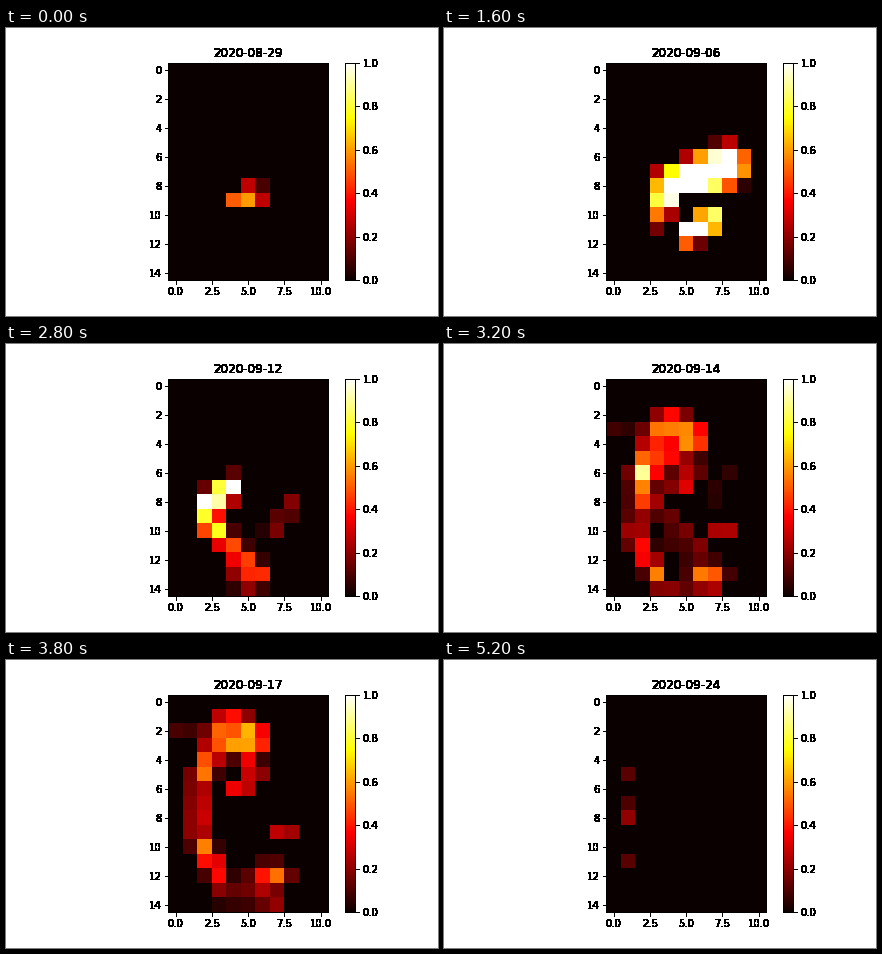
Recreate the animation shown at these times as a matplotlib script. Size 432x288 px, loop 6200 ms.

```python
import numpy as np
import matplotlib.pyplot as plt
from matplotlib.animation import FuncAnimation

ROWS, COLS = 15, 11
Y, X = np.mgrid[:ROWS, :COLS]
LAST_DAY = 26
START = np.datetime64("2020-08-29")


def front(a, b, heat, reach=1.1):
    """Heat along the line a-b, fading linearly to nothing at reach."""
    (ay, ax_), (by, bx) = a, b
    dy, dx = by - ay, bx - ax_
    size = dy * dy + dx * dx or 1
    t = np.clip(((Y - ay) * dy + (X - ax_) * dx) / size, 0, 1)
    dist = np.hypot(Y - ay - t * dy, X - ax_ - t * dx)
    return heat * np.clip(1 - dist / reach, 0, None)


def spot(at, heat):
    return front(at, at, heat)


def field(*parts):
    g = np.clip(sum(parts), 0, 1)
    return np.where(g < .04, 0, g)


ignition = field(
    front((9, 4), (9, 5), .5, 1),
    front((8, 5), (9, 6), .27))
smoulder = field(front((9.2, 4.6), (10.5, 4.8), .42))
outbreak = field(
    front((8.1, 4.2), (6.6, 7.8), 1.75, 1.9),    # main ridge
    front((9.3, 5), (9, 6.5), -1.1, 1),          # burnt-out gap
    front((9.4, 3.1), (10.2, 3.3), .7),          # western hook
    front((11.2, 5.2), (10.4, 6.6), 1.6, 1.2))   # southern pocket
westward = field(
    front((8.1, 2.1), (7, 3.9), 1.4),
    front((9, 2.4), (10, 2.5), .85),
    front((10.5, 3.2), (13.1, 5.7), .6),
    front((13, 4), (14, 5), .2, 1),
    front((8, 8.1), (10, 6.8), .2, 1))
peak = field(
    front((2.2, 3.8), (2.6, 5), 2, 1.9),         # northern core
    front((1.8, 0), (1.8, 2), .2),
    front((3, 2.8), (5, 2), 1.4),                # western limb
    front((5, 1.65), (8, 1.65), .75),
    front((9.3, 1.5), (12, 3), .95),
    front((5, 5.3), (6, 4.5), 1),                # inner curl
    front((9, 7), (9, 8), .6, 1),
    front((12, 6), (12, 7), 1.1, 1.3),           # southern edge
    front((13, 3), (13.7, 7), .42, 1.2))
embers = field(spot((5, 1), .12), spot((7.7, .9), .28), spot((11, 1), .12))

STAGES = {0: ignition, 4: smoulder, 8: outbreak, 14: westward,
          17: peak, 21: field(0 * X), 26: embers}


def centre(g):
    return np.array([(Y * g).sum(), (X * g).sum()]) / g.sum()


def shift(g, step):
    dy, dx = np.rint(step).astype(int)
    pad = 8
    p = np.pad(g, pad)
    return p[pad - dy:pad - dy + ROWS, pad - dx:pad - dx + COLS]


def heat_map(day):
    """Drift and blend from one stage to the next, with some flicker."""
    if day in STAGES:
        return STAGES[day]
    a = max(d for d in STAGES if d < day)
    b = min(d for d in STAGES if d > day)
    u = (day - a) / (b - a)
    old, new = STAGES[a], STAGES[b]
    move = np.zeros(2)
    if old.any() and new.any():
        move = centre(new) - centre(old)
    g = (1 - u) * shift(old, u * move) + u * u * shift(new, (u - 1) * move)
    return field(g * np.random.default_rng(day).uniform(.7, 1.3, g.shape))


def solid(img, dpi):
    """Turn soft edges fully opaque."""
    img[..., 3] = img[..., 3] > 0
    return img, 0, 0


plt.rcParams["font.family"] = "DejaVu Sans"
plt.rcParams["text.kerning_factor"] = 6
fig, ax = plt.subplots(figsize=(6, 4), dpi=72)
fig.subplots_adjust(left=.125, right=.9, bottom=.125, top=.88)
im = ax.imshow(heat_map(0), cmap="hot", vmin=0, vmax=1,
               interpolation="nearest")
bar = fig.colorbar(im, ax=ax)
ax.set_xticks(np.arange(0, 10.1, 2.5))
ax.set_yticks(range(0, 15, 2))
bar.set_ticks(np.linspace(0, 1, 6))
title = ax.set_title(str(START))

crisp = [title, bar.outline, *ax.spines.values()]
for axis in (ax.xaxis, ax.yaxis, bar.ax.yaxis):
    crisp += [*axis.get_ticklabels(), *axis.get_ticklines()]
for artist in crisp:
    artist.set_agg_filter(solid)


def draw(n):
    day = min(n, LAST_DAY)
    im.set_data(heat_map(day))
    title.set_text(str(START + day))
    return im, title


anim = FuncAnimation(fig, draw, frames=31, interval=200, repeat=True)
plt.show()
```
